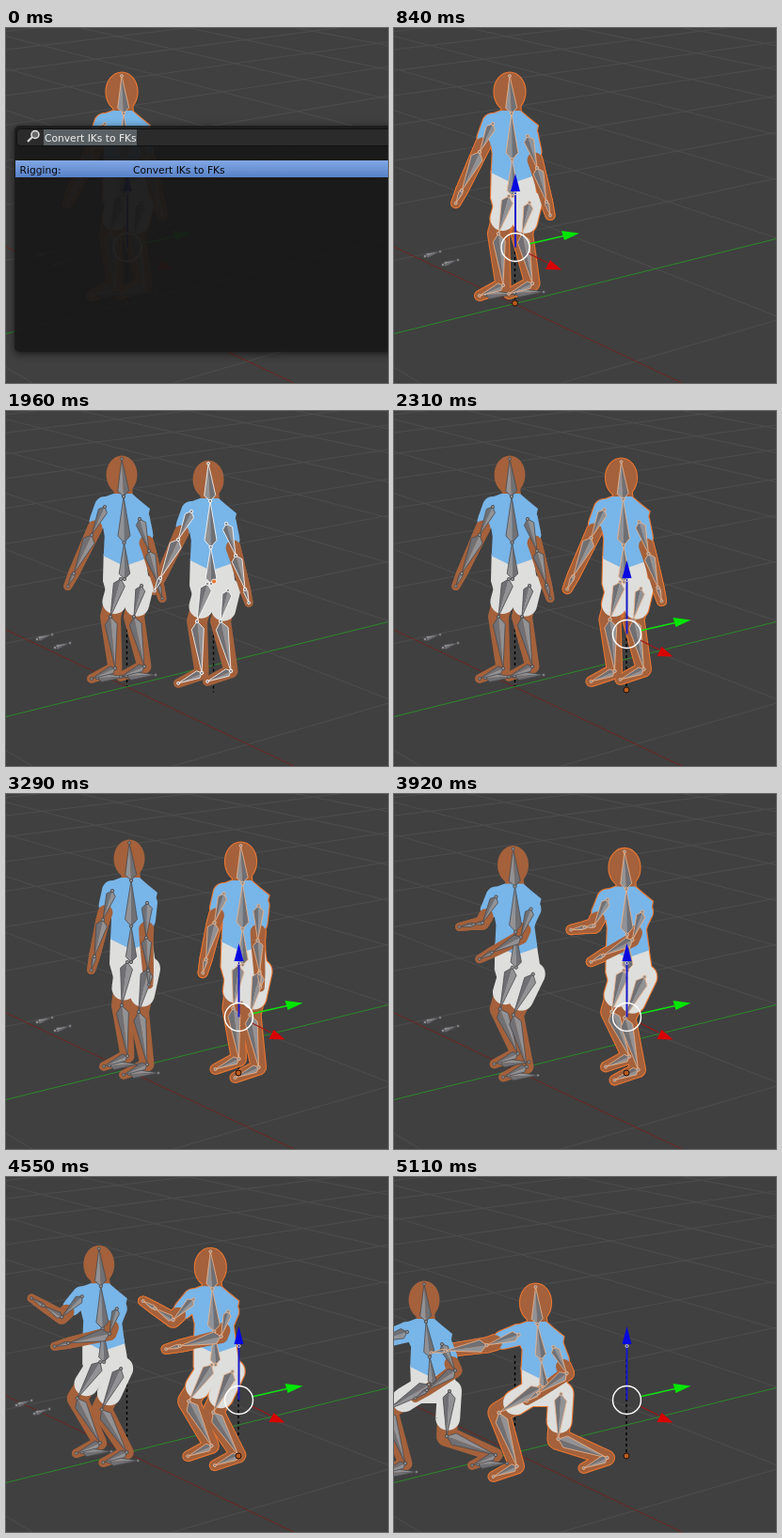
Recreate the animation shown at these times as an HTML page with a canvas. Size 406 by 378 pixels, loop 5180 ms.

```html
<!DOCTYPE html>
<html>
<head>
<meta charset="utf-8">
<style>
  html, body { margin: 0; width: 100%; height: 100%; overflow: hidden; background: #404040; }
  canvas { display: block; }
</style>
</head>
<body>
<canvas id="stage" width="406" height="378"></canvas>
<script>
const ctx = document.getElementById('stage').getContext('2d');
const LOOP = 5180, STEP = 70;
const SKIN = '#a4613b', SHIRT = '#78b5e8', PANTS = '#dededc', ORANGE = '#e87632';
const ORIGIN = [128.5, 293];

// Each pose: pelvis, neck, then elbow and wrist, knee and ankle of both sides.
const STAND = [[126,179], [125,91], [91,132], [72,173], [152,149], [162,185], [111,219], [116,274], [136,219], [147,272]];
const STRAIGHT = [[133,179], [133,92], [103,134], [94,173], [149,153], [151,188], [123,225], [129,279], [141,232], [150,288]];
const CROUCH = [[128,188], [126,102], [89,139], [79,120], [127,152], [78,158], [107,231], [133,275], [119,237], [136,292]];
const LUNGE = [[41,221], [34,154], [-20,176], [-64,182], [65,206], [35,227], [-7,248], [12,305], [56,276], [108,296]];

const POSE_KEYS = [
  [2310, STAND], [3290, STRAIGHT], [4270, CROUCH], [4480, mix(CROUCH, LUNGE, .1)],
  [4830, mix(CROUCH, LUNGE, .97)], [4970, mix(CROUCH, LUNGE, .97)], [5110, LUNGE]
];
const DRAG_KEYS = [[1190, [0, 0]], [1610, [48, 8]], [2170, [118.5, 3]]];

function mix(a, b, k) {
  return Array.isArray(a) ? a.map((v, i) => mix(v, b[i], k)) : a + (b - a) * k;
}

function track(keys, t) {
  if (t <= keys[0][0]) return keys[0][1];
  const i = keys.findIndex(key => t <= key[0]);
  if (i < 0) return keys[keys.length - 1][1];
  const [t0, a] = keys[i - 1], [t1, b] = keys[i];
  return mix(a, b, (t - t0) / (t1 - t0));
}

const shift = ([x, y], dx, dy) => [x + dx, y + dy];

// Fill in the joints that follow from the key points.
function skeleton([pelvis, neck, elbowL, wristL, elbowR, wristR, kneeL, ankleL, kneeR, ankleR]) {
  const arm = (shoulder, elbow, wrist) => {
    const reach = Math.hypot(wrist[0] - elbow[0], wrist[1] - elbow[1]);
    return [shoulder, elbow, wrist, mix(elbow, wrist, 1 + 15 / reach)];
  };
  const leg = (hip, knee, ankle) => [hip, knee, ankle, shift(ankle, -25, 11)];
  return {
    spine: [pelvis, mix(pelvis, neck, .44), neck, shift(neck, -2, -40)],
    legL: leg(shift(pelvis, -4, 0), kneeL, ankleL),
    legR: leg(shift(pelvis, 18, 7), kneeR, ankleR),
    armL: arm(shift(neck, -20, 11), elbowL, wristL),
    armR: arm(shift(neck, 17, 24), elbowR, wristR)
  };
}

function line(a, b, color, width = 1) {
  ctx.strokeStyle = color;
  ctx.lineWidth = width;
  ctx.beginPath();
  ctx.moveTo(...a);
  ctx.lineTo(...b);
  ctx.stroke();
}

function shape(points, fill, edge) {
  ctx.beginPath();
  points.forEach(p => ctx.lineTo(...p));
  ctx.closePath();
  if (fill) { ctx.fillStyle = fill; ctx.fill(); }
  if (edge) { ctx.strokeStyle = edge; ctx.stroke(); }
}

function dot([x, y], r, fill, edge) {
  ctx.beginPath();
  ctx.arc(x, y, r, 0, 7);
  if (fill) { ctx.fillStyle = fill; ctx.fill(); }
  if (edge) { ctx.strokeStyle = edge; ctx.stroke(); }
}

function polygon(points) {
  const path = new Path2D();
  points.forEach(p => path.lineTo(...p));
  path.closePath();
  return path;
}

// Chain of tapered capsules.
function limb(joints, radii) {
  const path = new Path2D();
  joints.forEach(([x, y], i) => {
    const r = radii[i];
    path.moveTo(x + r, y);
    path.arc(x, y, r, 0, Math.PI * 2);
    if (!i) return;
    const [px, py] = joints[i - 1], pr = radii[i - 1];
    const length = Math.hypot(x - px, y - py) || 1;
    const nx = (y - py) / length, ny = (px - x) / length;
    path.moveTo(px + nx * pr, py + ny * pr);
    path.lineTo(x + nx * r, y + ny * r);
    path.lineTo(x - nx * r, y - ny * r);
    path.lineTo(px - nx * pr, py - ny * pr);
    path.closePath();
  });
  return path;
}

function drawBody({ spine, legL, legR, armL, armR }, selected) {
  const [pelvis, , neck] = spine;
  const waist = mix(pelvis, neck, .27);
  const skull = shift(neck, -2, -23);
  const head = new Path2D();
  head.ellipse(...skull, 16.5, 20.5, 0, 0, Math.PI * 2);

  const hips = polygon([
    shift(waist, -22, -3), shift(waist, 22, -3), shift(pelvis, 26, 2),
    shift(pelvis, 20, 20), shift(pelvis, -18, 20), shift(pelvis, -23, 2)
  ]);
  const torso = polygon([
    shift(neck, -11, -3), shift(armL[0], -7, -8), shift(waist, -21, -22), shift(waist, -22, -1),
    shift(waist, 0, 10), shift(waist, 23, 2), shift(waist, 20, -20), shift(armR[0], 11, -11),
    shift(neck, 17, 4), shift(neck, 9, -3)
  ]);
  const arm = joints => limb(joints, [8, 7.5, 6, 4.5]);
  const leg = joints => limb(joints, [11, 11, 7.5, 5]);
  const forearm = ([a, b, c, d]) => arm([mix(a, b, .75), b, c, d]);
  const sleeve = ([a, b]) => limb([a, mix(a, b, .5)], [11, 9.5]);
  const thigh = ([a, b]) => limb([a, mix(a, b, .6)], [13, 13]);

  const parts = [
    [arm(armL), SKIN], [arm(armR), SKIN], [leg(legL), SKIN], [leg(legR), SKIN],
    [limb([skull, neck], [10, 10]), SKIN], [head, SKIN],
    [thigh(legL), PANTS], [thigh(legR), PANTS], [hips, PANTS],
    [torso, SHIRT], [sleeve(armL), SHIRT], [sleeve(armR), SHIRT],
    [forearm(armL), SKIN], [forearm(armR), SKIN]
  ];
  if (selected) {
    ctx.strokeStyle = ORANGE;
    ctx.lineWidth = 2.2;
    parts.forEach(([path]) => ctx.stroke(path));
  }
  parts.forEach(([path, color]) => { ctx.fillStyle = color; ctx.fill(path); });
}

function bone(a, b, edge) {
  const dx = b[0] - a[0], dy = b[1] - a[1], length = Math.hypot(dx, dy) || 1;
  const half = Math.min(6.5, Math.max(2, length * .15)) / length;
  const [mx, my] = mix(a, b, .15);
  const left = [mx + dy * half, my - dx * half], right = [mx - dy * half, my + dx * half];
  shape([a, left, b], '#929295');
  shape([a, right, b], '#707074');
  ctx.lineWidth = .8;
  shape([a, left, b, right], null, edge);
  dot(a, 1.7, '#8c8c8e', edge);
  dot(b, 1.5, '#8c8c8e', edge);
}

function drawBones(pose, edge) {
  for (const joints of Object.values(pose)) {
    for (let i = 1; i < joints.length; i++) bone(joints[i - 1], joints[i], edge);
  }
}

// Foot targets, and two knee targets on the floor that follow the lunge.
function drawControls({ spine, legL, legR }, edge) {
  for (const [, , ankle, toe] of [legL, legR]) bone(shift(toe, 6, -1), shift(ankle, 12, 9), edge);
  const slide = Math.min(0, spine[0][0] - STAND[0][0]);
  for (const start of [[33, 243], [52, 252]]) {
    bone(shift(start, slide, 0), shift(start, slide + 16, -5), edge);
  }
}

function drawGround() {
  ctx.fillStyle = '#404040';
  ctx.fillRect(0, 0, 406, 378);
  const greenVanish = [2361, -260], redVanish = [-1040, -260];
  const ray = (from, through, color) => line(from, mix(from, through, 2), color);
  for (let n = -3; n <= 9; n++) {
    if (!n) continue;
    ray(greenVanish, mix(ORIGIN, redVanish, n / (n + 10)), '#4d4d4d');
    ray(redVanish, mix(ORIGIN, greenVanish, n / (n + 14)), '#4d4d4d');
  }
  line([0, 233], [306, 378], '#6e2420');
  line([0, 325.5], [406, 224.5], '#2b8a2b');
}

function drawDashes() {
  ctx.setLineDash([3, 3]);
  line([ORIGIN[0], 190], ORIGIN, '#000', 1.4);
  ctx.setLineDash([]);
}

function drawGizmo() {
  const center = [129, 233.5];
  line(center, [129, 174], '#1818c8', 2);
  line([143, 230], [180, 221.5], '#10e010', 1.4);
  line([143, 240], [163, 250], '#a01414', 1.2);
  shape([[124, 174], [129, 155], [134, 174]], '#0808e0');
  shape([[178, 216], [197, 218.5], [181, 226]], '#00e600');
  shape([[166, 247], [178, 257.5], [161, 257]], '#d80000');
  ctx.lineWidth = 1;
  dot([129, 176], 1.5, null, '#d8d8d8');
  ctx.lineWidth = 1.4;
  dot(center, 15, null, '#fff');
  ctx.lineWidth = 1;
  dot(ORIGIN, 3, '#b85a20', '#201008');
}

function at([x, y], draw) {
  ctx.save();
  ctx.translate(x, y);
  draw();
  ctx.restore();
}

function drawMenu() {
  ctx.save();
  ctx.shadowColor = 'rgba(0,0,0,.7)';
  ctx.shadowBlur = 9;
  ctx.shadowOffsetY = 2;
  ctx.fillStyle = 'rgba(27,27,27,.87)';
  ctx.beginPath();
  ctx.roundRect(9, 104, 420, 241, 5);
  ctx.fill();
  ctx.restore();

  ctx.lineWidth = 1;
  ctx.strokeStyle = '#111';
  ctx.fillStyle = '#2b2b2b';
  ctx.beginPath();
  ctx.roundRect(11.5, 107.5, 420, 18, 4);
  ctx.fill();
  ctx.stroke();
  ctx.fillStyle = '#596063';
  ctx.fillRect(40, 108, 99, 17);

  line([23, 121], [28, 116], '#d8d8d8', 2.2);
  ctx.lineWidth = 1.5;
  dot([31, 113.5], 4, '#6a6a6a', '#e4e4e4');

  const bar = ctx.createLinearGradient(0, 141, 0, 159);
  bar.addColorStop(0, '#82a7e4');
  bar.addColorStop(1, '#5781c8');
  ctx.fillStyle = bar;
  ctx.fillRect(10, 141, 396, 18);

  ctx.font = '10.7px "DejaVu Sans", sans-serif';
  ctx.fillStyle = '#f0f0f0';
  ctx.fillText('Convert IKs to FKs', 41, 121);
  ctx.fillStyle = '#080808';
  ctx.fillText('Rigging:', 14.5, 155);
  ctx.fillText('Convert IKs to FKs', 135, 155);
}

function render(t) {
  const pose = skeleton(track(POSE_KEYS, t));
  const copied = t >= 1190;
  const grabbing = copied && t < 2310;
  const offset = track(DRAG_KEYS, t);
  const pivot = [offset[0], offset[1] * 4 / 3];

  drawGround();
  drawDashes();
  if (copied) at(pivot, drawDashes);
  at(offset, () => drawBody(pose, !grabbing));
  if (copied) drawBody(pose, false);
  drawControls(pose, '#4a4a4d');
  if (copied) drawBones(pose, '#4a4a4d');
  at(offset, () => drawBones(pose, grabbing ? '#ffffff' : '#f0b58c'));
  at(pivot, () => grabbing ? dot([129, 175], 2.5, ORANGE, '#fff') : drawGizmo());
  if (t < 70) drawMenu();
}

function frame() {
  const t = performance.now() % LOOP;
  render(Math.floor(t / STEP) * STEP);
  requestAnimationFrame(frame);
}
frame();
</script>
</body>
</html>
```
